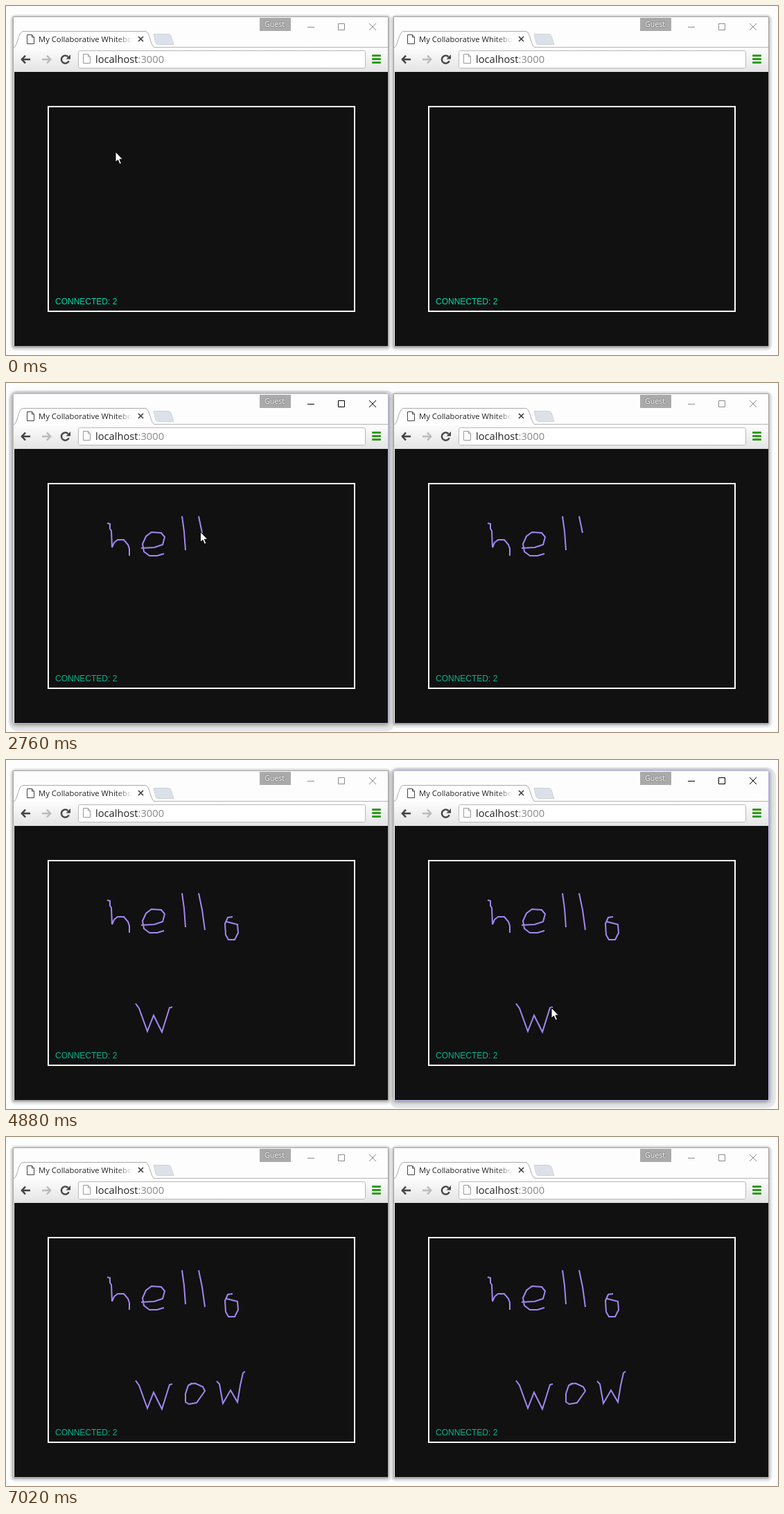
An HTML page with a canvas for the animation above (7.04 s loop, 1114 by 503 pixels).

```html
<!DOCTYPE html>
<html lang="en">
<head>
<meta charset="utf-8">
<title>Collaborative whiteboard</title>
<style>
  html, body { margin: 0; overflow: hidden; background: #fdfdfd; }
  canvas { display: block; }
</style>
</head>
<body>
<canvas id="stage" width="1114" height="503"></canvas>
<script>
const ctx = document.getElementById('stage').getContext('2d');
const LOOP = 7040, GAP = 549;
const SANS = '"Open Sans", sans-serif';

// Pen timeline: [start ms, end ms, pen down, path in stage coordinates]
const timeline = [
  [30, 700, 0, '160,209 154,206 146,202'],
  [820, 900, 1, '146,202 150,203 150,210 152,213 153,237'],
  [900, 1350, 1, '153,237 156,230 161,226 170,226 176,233 178,239 178,249'],
  [1350, 1510, 0, '178,249 195,238'],
  [1530, 1990, 1, '195,238 214,237 226,233 229,222 224,216 210,215 202,221 197,232 199,243 207,249 218,249 228,246'],
  [1990, 2170, 0, '228,246 254,192'],
  [2290, 2510, 1, '254,192 257,214 259,241'],
  [2510, 2670, 0, '259,241 278,192'],
  [2680, 2880, 1, '278,192 283,216 287,245'],
  [2880, 2990, 0, '287,245 327,226'],
  [3010, 3480, 1, '327,226 320,227 316,236 317,252 321,259 330,259 335,249 334,237 318,233'],
  [3640, 3980, 0, '318,233 735,355'],
  [4140, 4190, 0, '735,355 735,350'],
  [4380, 4880, 1, '736,351 741,358 753,391 762,368 774,392 785,357 789,356'],
  [4880, 5070, 0, '789,356 818,355'],
  [5100, 5510, 1, '818,355 812,358 808,370 808,382 813,385 824,383 836,366 833,360 822,355 814,356'],
  [5540, 5770, 0, '814,356 853,352'],
  [5780, 6230, 1, '853,352 857,356 862,384 873,365 883,382 887,358 891,340 894,338'],
  [6230, 6510, 0, '894,338 997,455'],
  [6540, 6800, 0, '997,455 1080,506']
].map(([start, end, down, path]) => {
  const pts = path.split(' ').map(p => p.split(',').map(Number));
  let length = 0;
  pts.forEach((p, i) => { if (i) length += Math.hypot(p[0] - pts[i - 1][0], p[1] - pts[i - 1][1]); });
  return { start, end, down, pts, length };
});

// The points of a path up to fraction f of its length
function partOf({ pts, length }, f) {
  let left = length * f;
  const part = [pts[0]];
  for (let i = 1; i < pts.length && left > 0; i++) {
    const [ax, ay] = pts[i - 1], [bx, by] = pts[i];
    const d = Math.hypot(bx - ax, by - ay), k = Math.min(1, left / d);
    part.push([ax + (bx - ax) * k, ay + (by - ay) * k]);
    left -= d;
  }
  return part;
}

function trace(points) {
  ctx.beginPath();
  points.forEach(([x, y]) => ctx.lineTo(x, y));
}

function stroke(color, width, ...points) {
  trace(points);
  ctx.strokeStyle = color;
  ctx.lineWidth = width;
  ctx.stroke();
}

function box(color, x, y, w, h, r = 0) {
  ctx.beginPath();
  ctx.roundRect(x, y, w, h, r);
  ctx.fillStyle = color;
  ctx.fill();
}

function frame(color, width, x, y, w, h, r = 0) {
  ctx.beginPath();
  ctx.roundRect(x, y, w, h, r);
  ctx.strokeStyle = color;
  ctx.lineWidth = width;
  ctx.stroke();
}

function label(text, x, y, font, color) {
  ctx.font = font;
  ctx.fillStyle = color;
  ctx.fillText(text, x, y);
}

function halo(active) {
  if (active) box('#e8e8e8', 4, 11, 558, 491, 14);
  else box('#efefef', 6, 12, 551, 485, 9);
}

function pageIcon(x, y, color) {
  stroke(color, 1, [x + 7, y], [x, y], [x, y + 13], [x + 10, y + 13], [x + 10, y + 3.5],
    [x + 7, y], [x + 7, y + 3.5], [x + 10, y + 3.5]);
}

function arrow(x, dir, color) {
  stroke(color, 2.6, [x, 77], [x + 13 * dir, 77]);
  stroke(color, 2.6, [x + 6 * dir, 71.5], [x + dir, 77], [x + 6 * dir, 82.5]);
}

function tabStrip() {
  stroke('#b4b4b4', 1, [11, 59.5], [551, 59.5]);
  ctx.beginPath();
  ctx.moveTo(11, 60);
  ctx.bezierCurveTo(17, 59, 17, 36.5, 25, 36.5);
  ctx.lineTo(201, 36.5);
  ctx.bezierCurveTo(208, 36.5, 208, 59, 215, 60);
  ctx.fillStyle = '#fff';
  ctx.fill();
  ctx.strokeStyle = '#aaa';
  ctx.stroke();

  ctx.beginPath();
  ctx.moveTo(213, 40.5);
  ctx.lineTo(234, 40.5);
  ctx.quadraticCurveTo(237, 40.5, 238, 43);
  ctx.lineTo(242, 55.5);
  ctx.lineTo(220, 55.5);
  ctx.quadraticCurveTo(217, 55.5, 216, 53);
  ctx.closePath();
  ctx.fillStyle = '#dce0e8';
  ctx.fill();
  ctx.strokeStyle = '#cfd3da';
  ctx.stroke();

  pageIcon(30.5, 41.5, '#444');
  const fade = ctx.createLinearGradient(160, 0, 182, 0);
  fade.addColorStop(0, '#222');
  fade.addColorStop(1, '#2220');
  label('My Collaborative Whiteboard', 47, 52, '11.25px ' + SANS, fade);
  stroke('#444', 1.7, [191, 44], [198, 51]);
  stroke('#444', 1.7, [198, 44], [191, 51]);
}

function toolbar() {
  const shade = ctx.createLinearGradient(0, 60, 0, 95);
  shade.addColorStop(0, '#fdfdfd');
  shade.addColorStop(1, '#e4e4e4');
  box(shade, 11, 60, 540, 35);
  arrow(22, 1, '#444');
  arrow(65, -1, '#bbb');

  ctx.beginPath();
  ctx.arc(85.5, 77, 5.6, 0.4, 5.5);
  ctx.strokeStyle = '#444';
  ctx.lineWidth = 2.4;
  ctx.stroke();
  trace([[93, 70], [93, 76.5], [86.5, 76.5]]);
  ctx.fillStyle = '#444';
  ctx.fill();

  box('#fff', 104, 64, 415, 26, 2);
  frame('#b8b8b8', 1, 104.5, 64.5, 414, 25, 2);
  pageIcon(111.5, 69.5, '#999');
  const font = '14.7px ' + SANS;
  label('localhost', 129, 82, font, '#222');
  label(':3000', 129 + ctx.measureText('localhost').width, 82, font, '#888');
  [70, 75, 80].forEach(y => box('#2e9c18', 528, y, 13, 3, 1));
}

function captionButtons(active) {
  box('#aaa', 366, 17, 45, 19);
  ctx.shadowColor = '#444';
  ctx.shadowBlur = 2;
  label('Guest', 373, 30, '10.6px ' + SANS, '#fff');
  ctx.shadowColor = 'transparent';
  const color = active ? '#000' : '#8c8c8c';
  stroke(color, 1, [435, 30.5], [445, 30.5]);
  frame(color, 1, 479.5, 25.5, 9, 9);
  stroke(color, 1, [524, 25], [534, 35]);
  stroke(color, 1, [534, 25], [524, 35]);
}

function board(t) {
  box('#111', 12, 95, 539, 395);
  frame('#fff', 2, 61, 145, 442, 295);
  label('CONNECTED: 2', 71, 430, '12px "Liberation Sans", Arial, sans-serif', t < 820 ? '#00dcaa' : '#00b890');
  for (const s of timeline) {
    if (!s.down || t < s.start) continue;
    const f = Math.min(1, (t - s.start + 10) / (s.end - s.start));
    stroke('#a288f2', 2, ...partOf(s, f).map(([x, y]) => [x % GAP, y]));
  }
}

function browser(t, active) {
  ctx.shadowColor = active ? '#0008' : '#0007';
  ctx.shadowBlur = active ? 7 : 4;
  ctx.shadowOffsetY = 1;
  box('#fdfdfd', 10, 15, 542, 476);
  ctx.shadowColor = 'transparent';
  ctx.shadowOffsetY = 0;
  captionButtons(active);
  tabStrip();
  toolbar();
  board(t);
  frame(active ? '#b6b6ec' : '#a4a4a4', 1, 10.5, 15.5, 541, 475);
}

function cursor(t) {
  const step = timeline.findLast(s => t >= s.start) || timeline[0];
  const f = Math.min(1, Math.max(0, (t - step.start) / (step.end - step.start)));
  const [x, y] = partOf(step, step.down ? f : f * f * (3 - 2 * f)).at(-1);
  const shape = [[0, 0], [0, 15], [3.5, 12], [6, 18], [8.5, 17], [6, 11], [10.5, 11]];
  trace(shape.map(([dx, dy]) => [x - 2 + dx, y + 1 + dy]));
  ctx.closePath();
  ctx.strokeStyle = '#000';
  ctx.lineWidth = 1;
  ctx.fillStyle = '#fff';
  ctx.fill();
  ctx.stroke();
}

function at(dx, draw) {
  ctx.save();
  ctx.translate(dx, 0);
  draw();
  ctx.restore();
}

function render() {
  const t = performance.now() % LOOP;
  const leftActive = t >= 730 && t < 4140;
  const rightActive = t >= 4140 && t < 7020;
  const windows = [[0, leftActive], [GAP, rightActive]];
  windows.sort((a, b) => a[1] - b[1]);
  box('#fdfdfd', 0, 0, 1114, 503);
  windows.forEach(([dx, active]) => at(dx, () => halo(active)));
  windows.forEach(([dx, active]) => at(dx, () => browser(t, active)));
  cursor(t);
  requestAnimationFrame(render);
}
render();
</script>
</body>
</html>
```
